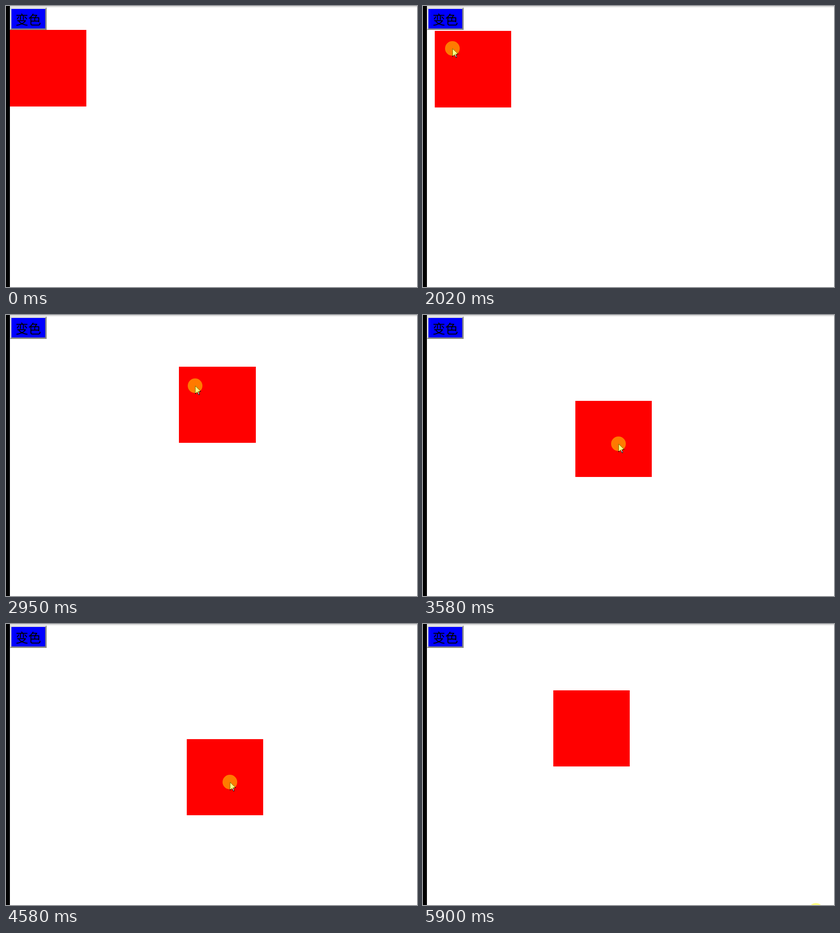
Recreate the animation shown at these times as an HTML page. Size 839 by 576 pixels, loop 5970 ms.

```html
<!DOCTYPE html>
<html lang="zh">
<head>
<meta charset="utf-8">
<title>Drag</title>
<style>
  html, body { margin: 0; width: 100%; height: 100%; overflow: hidden; background: #fff; }
  #stage { position: relative; width: 839px; height: 576px; overflow: hidden; background: #fff; }
  #stage > * { position: absolute; box-sizing: border-box; }
  #strip { left: 0; top: 0; width: 8px; height: 576px; background: #000; }
  #rule { left: 8px; top: 1px; width: 831px; height: 1px; background: #b2b2b2; }
  #button {
    left: 8px; top: 3px; width: 75px; height: 46px;
    border: 3px solid; border-color: #dcdcdc #868686 #868686 #dcdcdc;
    background: #00f; color: #000; text-align: center; white-space: nowrap;
    font: 300 26px/42px "Noto Sans CJK SC", "Noto Sans CJK", "Noto Sans", sans-serif;
  }
  #button.down { border-color: #868686 #dcdcdc #dcdcdc #868686; }
  #button.focus { outline: 1px solid #000; outline-offset: -1px; }
  #box { left: 0; top: 0; background: #f00; }
  #pointer { left: 0; top: 0; width: 32px; height: 34px; overflow: visible; }
</style>
</head>
<body>
<div id="stage">
  <div id="strip"></div>
  <div id="rule"></div>
  <div id="button">变色</div>
  <div id="box"></div>
  <svg id="pointer">
    <path d="M.5 .5V16.5L4.5 12.5 7.2 18.5H8.6V16.5L6.7 11.5H11.5Z" fill="#fff" stroke="#000" shape-rendering="crispEdges"/>
    <circle id="halo" r="15" fill="#ff0" fill-opacity=".48"/>
  </svg>
</div>
<script>
const LOOP = 5970, SIZE = 156.4;
const $ = id => document.getElementById(id);
const button = $('button'), box = $('box'), pointer = $('pointer'), halo = $('halo');

const steps = [];
let state = { t: 0, box: [8, 49.3], tip: [-99, -99], held: false, look: '' };
const add = (t, change) => steps.push(state = { ...state, ...change, t });

// Smooth curve through the key points, u from 0 to 1
function along(points, u) {
  const last = points.length - 1;
  const i = Math.min(Math.floor(u * last), last - 1), t = u * last - i;
  const at = k => points[Math.max(0, Math.min(last, k))];
  const [p, q, r, s] = [at(i - 1), at(i), at(i + 1), at(i + 2)];
  return q.map((v, k) => v + t / 2 * (r[k] - p[k]
    + t * (2 * p[k] - 5 * v + 4 * r[k] - s[k])
    + t * t * (3 * v - p[k] - 3 * r[k] + s[k])));
}

// The screen updates n times, evenly spread on a 10 ms clock
function burst(from, to, n, change) {
  for (let i = 0; i < n; i++) {
    const u = i / (n - 1);
    add(from + Math.ceil((to - from) * u / 10) * 10, change(u));
  }
}

const glide = (from, to, n, ...points) =>
  burst(from, to, n, u => ({ tip: along(points, u) }));

// The pointer holds the box at an offset that may slip from a to b
const drag = (from, to, n, [a, b], ...points) => burst(from, to, n, u => {
  const pos = along(points, u);
  const tip = pos.map((v, k) => Math.round(v) + a[k] + (b[k] - a[k]) * u);
  return { box: pos, tip, held: true, look: '' };
});

const corner = [36, 36], slipped = [39, 24], center = [88, 88];

add(0, {});
glide(100, 650, 8, [708, 556], [330, 205], [141, 36]);
glide(710, 940, 4, [125, 34], [65, 31]);
add(1110, { tip: [62, 31], held: true, look: 'down focus' });
add(1250, { held: false, look: 'focus' });
glide(1410, 1810, 6, [60, 36], [56, 60], [60, 85]);

drag(2020, 2560, 8, [corner, slipped], [24, 51.3], [190, 250], [420, 275], [531.3, 195]);
drag(2630, 3180, 8, [slipped, [28, 50]], [534, 150], [447, 76], [325, 120], [305, 141]);

add(3350, { held: false });
glide(3350, 3510, 3, [350, 205], [393, 229]);
drag(3580, 3890, 5, [center, center], [311, 176], [362, 295], [503, 390]);
drag(3960, 4500, 8, [center, center], [631.3, 445], [693, 305], [395, 158], [256, 205]);
drag(4580, 5120, 8, [center, center], [369, 236], [590, 212], [440, 147], [266, 136]);

add(5190, { held: false });
glide(5190, 5360, 3, [602, 299], [802, 587]);
add(5900, { held: true });

const move = (el, x, y) => { el.style.transform = `translate(${x}px, ${y}px)`; };

function draw() {
  const now = performance.now() % LOOP;
  const s = steps.findLast(step => step.t <= now);
  const [x, y] = s.box.map(Math.round);
  const [right, bottom] = s.box.map(v => Math.round(v + SIZE));
  move(box, x, y);
  box.style.width = right - x + 'px';
  box.style.height = bottom - y + 'px';
  move(pointer, ...s.tip.map(Math.round));
  halo.style.display = s.held ? '' : 'none';
  button.className = s.look;
  requestAnimationFrame(draw);
}
draw();
</script>
</body>
</html>
```
